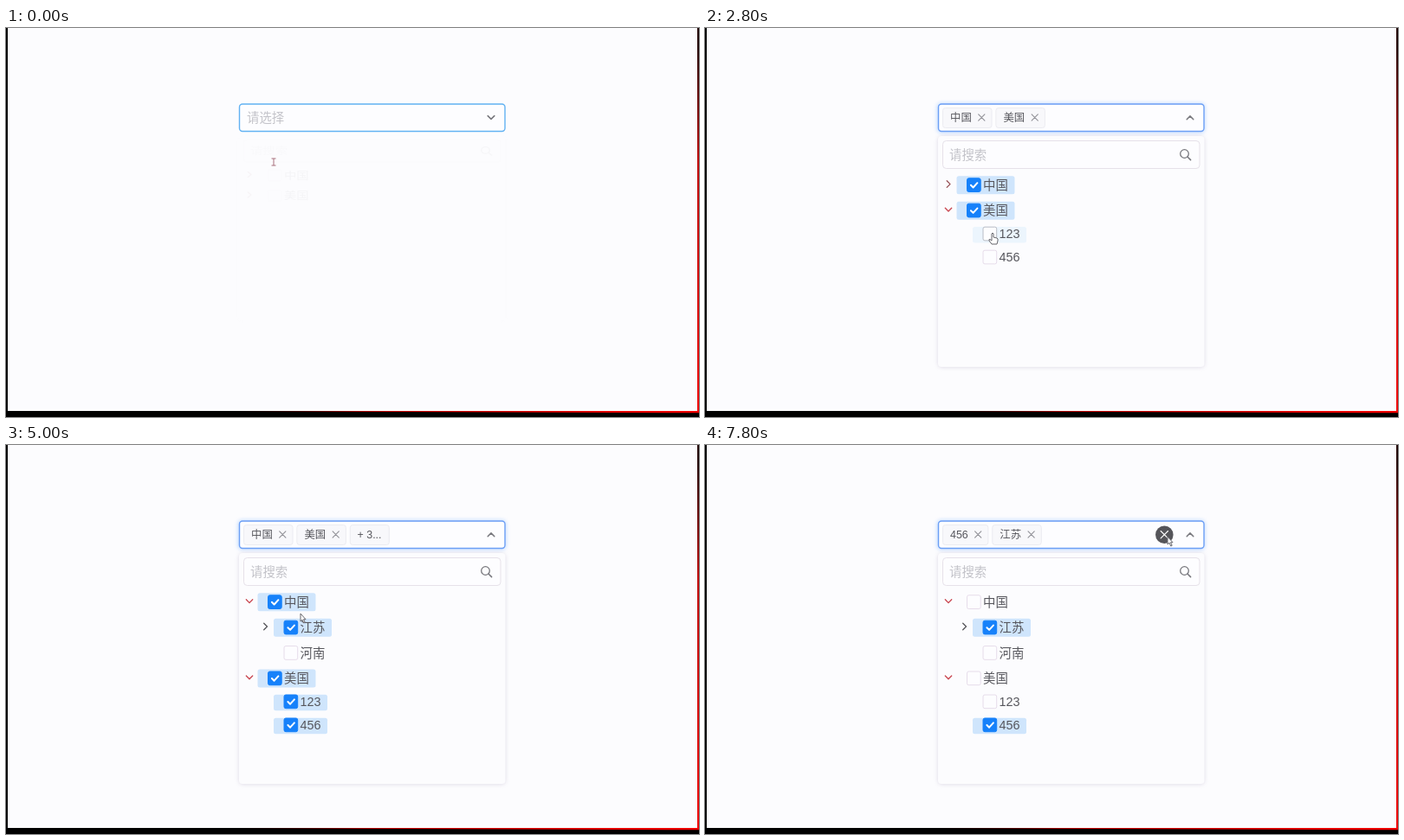
These frames come from a looping animation (800x450 px, 8000 ms). An HTML page:

```html
<!DOCTYPE html>
<html lang="zh-CN">
<head>
<meta charset="utf-8">
<title>Tree select</title>
<style>
  html, body { margin: 0; width: 100%; height: 100%; overflow: hidden; background: #000; }
  svg { display: block; width: 800px; height: 450px; }
  text { font-family: "Liberation Sans", "Noto Sans CJK SC", "Noto Sans CJK", sans-serif; font-size: 14.4px; fill: #56565c; }
  .tag { font-size: 12.4px; }
  .hint { fill: #c3c3c9; }
  .line { fill: none; stroke-linecap: round; stroke-linejoin: round; }
</style>
</head>
<body>
<svg viewBox="0 0 800 450">
  <defs>
    <linearGradient id="bottom"><stop offset=".16" stop-color="#000"/><stop offset=".4" stop-color="#c00000"/><stop offset="1" stop-color="#f00000"/></linearGradient>
    <linearGradient id="side" x2="0" y2="1"><stop offset=".05" stop-color="#200"/><stop offset=".35" stop-color="#c00000"/><stop offset="1" stop-color="#f00000"/></linearGradient>
    <filter id="soft" x="-10%" y="-10%" width="120%" height="120%"><feGaussianBlur stdDeviation="2.2"/></filter>
  </defs>
  <rect width="800" height="450"/>
  <path d="M150 443H800V445.3Z" fill="url(#bottom)"/>
  <rect x="798" width="2" height="444" fill="url(#side)"/>
  <rect x="2" width="796" height="443" fill="#fcfcfe"/>
  <g id="view"></g>
</svg>
<script>
const LOOP = 8000, STEP = 200;
const view = document.getElementById('view');

const tree = [
  { name: '中国', kids: [{ name: '江苏', kids: [] }, { name: '河南' }] },
  { name: '美国', kids: [{ name: '123' }, { name: '456' }] }
];

// time, name toggled in the selection
const toggles = [
  [800, '中国'], [1400, '美国'], [3000, '123'], [3400, '456'],
  [4600, '江苏'], [6000, '美国'], [6400, '123'], [7000, '中国']
];
const expandAt = { '美国': 2000, '中国': 4000 };

// time, pointer tip x, y, shape
const pointer = [
  [0, 309, 155, 'beam'], [200, 309, 160, 'beam'], [600, 309, 178, 'hand'], [800, 309, 178, 'hand'],
  [1200, 307, 208, 'hand'], [1400, 307, 208, 'hand'], [1800, 282, 208, 'hand'], [2000, 282, 208, 'hand'],
  [2800, 332, 237, 'hand'], [3000, 332, 237, 'hand'], [3200, 332, 262, 'hand'], [3400, 332, 262, 'hand'],
  [3800, 282, 180, 'hand'], [4000, 282, 180, 'arrow'], [4200, 341, 226, 'arrow'], [4400, 330, 209, 'hand'],
  [4800, 330, 209, 'hand'], [5000, 340, 195, 'arrow'], [5600, 385, 103, 'hand'], [5800, 385, 103, 'hand'],
  [6400, 382, 103, 'hand'], [6800, 325, 106, 'hand'], [7000, 325, 106, 'arrow'], [7600, 531, 106, 'arrow'],
  [7800, 534, 106, 'arrow'], [8000, 534, 106, 'arrow']
];

const isNumber = s => /^\d/.test(s);
const rect = (x, y, w, h, r, fill, stroke = 'none', extra = '') =>
  `<rect x="${x}" y="${y}" width="${w}" height="${h}" rx="${r}" fill="${fill}" stroke="${stroke}" ${extra}/>`;
const line = (d, color, width = 1.3) =>
  `<path class="line" d="${d}" stroke="${color}" stroke-width="${width}"/>`;
const label = (x, y, s, cls = '') => `<text x="${x}" y="${y}" class="${cls}">${s}</text>`;
const cross = (x, y, r, color) => line(`M${x - r} ${y - r}l${2 * r} ${2 * r}m0 ${-2 * r}l${-2 * r} ${2 * r}`, color, 1.1);

function pointerAt(t) {
  let i = pointer.length - 2;
  while (pointer[i][0] > t) i--;
  const [t0, x0, y0, shape] = pointer[i], [t1, x1, y1] = pointer[i + 1];
  const k = (t - t0) / (t1 - t0);
  return { x: x0 + (x1 - x0) * k, y: y0 + (y1 - y0) * k, shape };
}

function selectionAt(t) {
  const chosen = new Set();
  for (const [at, name] of toggles)
    if (at <= t && !chosen.delete(name)) chosen.add(name);
  return [...chosen];
}

function drawTags(names) {
  let x = 274.5, out = '';
  const box = w => rect(x, 92.5, w, 23, 3, '#f8f8fb', '#ececf1');
  for (const name of names.slice(0, 2)) {
    const w = isNumber(name) ? 20.7 : 24.8;
    out += box(w + 31.7) + label(x + 8.5, 108, name, 'tag') + cross(x + w + 20, 103.5, 3.6, '#909097');
    x += w + 36.6;
  }
  if (names.length > 2)
    out += box(45) + label(x + 8.3, 108, `+ ${names.length - 2}...`, 'tag');
  return out;
}

function drawRow(node, depth, y, t, chosen, tip) {
  const dx = depth * 18.5, number = isNumber(node.name);
  const left = 290.5 + dx, w = number ? 62 : 67, h = number ? 18.5 : 21;
  const checked = chosen.includes(node.name);
  const hover = tip.x > left && tip.x < left + w && Math.abs(tip.y - y) < 10.5;
  let out = '';
  if (checked || hover)
    out += rect(left, y - h / 2 + (number ? 1 : 0), w, h, 2.5, checked ? '#cfe5fc' : '#ecf5fd');
  if (node.kids) {
    const open = t >= expandAt[node.name], ax = 281 + dx;
    out += open
      ? line(`M${ax - 3.7} ${y - 3}l3.7 3.8 3.7-3.8`, '#c9454f')
      : line(`M${ax - 1.8} ${y - 5}l3.8 3.8-3.8 3.8`, depth ? '#55555a' : '#965056');
  }
  const bx = 302.5 + dx;
  out += rect(bx, y - 8, 15.7, 15.7, 2, checked ? '#1681fa' : '#fdfdff', checked ? '#1681fa' : hover ? '#b9bdc6' : '#e6dcea');
  if (checked) out += line(`M${bx + 4.4} ${y}l2.7 2.7 4.8-5.3`, '#fff', 2);
  return out + label(321 + dx, y + 5.2, node.name);
}

function drawPanel(t, chosen, tip) {
  let y = 152.4;
  let out = rect(268.5, 125, 308.5, 268, 5, '#c9c3d6', 'none', 'opacity=".5" filter="url(#soft)"')
    + rect(269, 125, 307.5, 267, 4, '#fcfcfe')
    + rect(274.5, 130.5, 296.5, 32, 4, '#fdfdff', '#e6e1e9')
    + label(282, 151.5, '请搜索', 'hint')
    + `<circle class="line" cx="553.5" cy="145.5" r="4.8" stroke="#77777d" stroke-width="1.3"/>`
    + line('M557.2 149.2l3.4 3.4', '#77777d', 1.5);
  const walk = (nodes, depth) => {
    for (const node of nodes) {
      y += isNumber(node.name) ? 27 : 29.4;
      out += drawRow(node, depth, y, t, chosen, tip);
      if (t >= expandAt[node.name]) walk(node.kids, depth + 1);
    }
  };
  walk(tree, 0);
  return out;
}

function drawPointer({ x, y, shape }) {
  const paths = {
    beam: 'M-2.5-4h5M0-4v8M-2.5 4h5',
    hand: 'M-1 1Q0-1 1 1V5L5 6Q6.5 6.5 6 9L5 13H-1L-4 9Q-4.5 7-3 7.5L-1 9Z',
    arrow: 'M0 0V9L2 7.2 3.8 11 5.2 10.3 3.5 6.7H6Z'
  };
  const beam = shape === 'beam';
  return `<path transform="translate(${x} ${y})" d="${paths[shape]}" fill="${beam ? 'none' : '#fff'}" stroke="${beam ? '#a8707c' : '#66666c'}" stroke-width="1"/>`;
}

function render(t) {
  const tip = pointerAt(t), chosen = selectionAt(t), open = t >= STEP;
  let out = '';
  if (open) out += rect(267.5, 86.5, 310, 35, 5, '#9cc6ff', 'none', 'opacity=".55" filter="url(#soft)"');
  out += rect(269.5, 88, 306.5, 31.5, 3.5, '#fdfdff', open ? '#6c9ff5' : '#62b2f2', 'stroke-width="1.4"');
  out += chosen.length ? drawTags(chosen) : label(278, 108.6, '请选择', 'hint');
  out += line(open ? 'M556.2 105.7l3.8-3.8 3.8 3.8' : 'M556.2 101.6l3.8 3.8 3.8-3.8', '#77777d', 1.5);
  if (Math.hypot(tip.x - 530, tip.y - 104) < 10)
    out += '<circle cx="530.3" cy="103.7" r="10.3" fill="#55555a"/>' + cross(530.3, 103.7, 4.2, '#fff');
  const panel = drawPanel(t, chosen, tip);
  out += open ? panel : `<g opacity=".04" transform="translate(0 25) scale(1 .8)">${panel}</g>`;
  view.innerHTML = out + drawPointer(tip);
}

let shown = -1;
function tick(now) {
  const t = Math.floor(now % LOOP / STEP) * STEP;
  if (t !== shown) render(shown = t);
  requestAnimationFrame(tick);
}
tick(performance.now());
</script>
</body>
</html>
```
